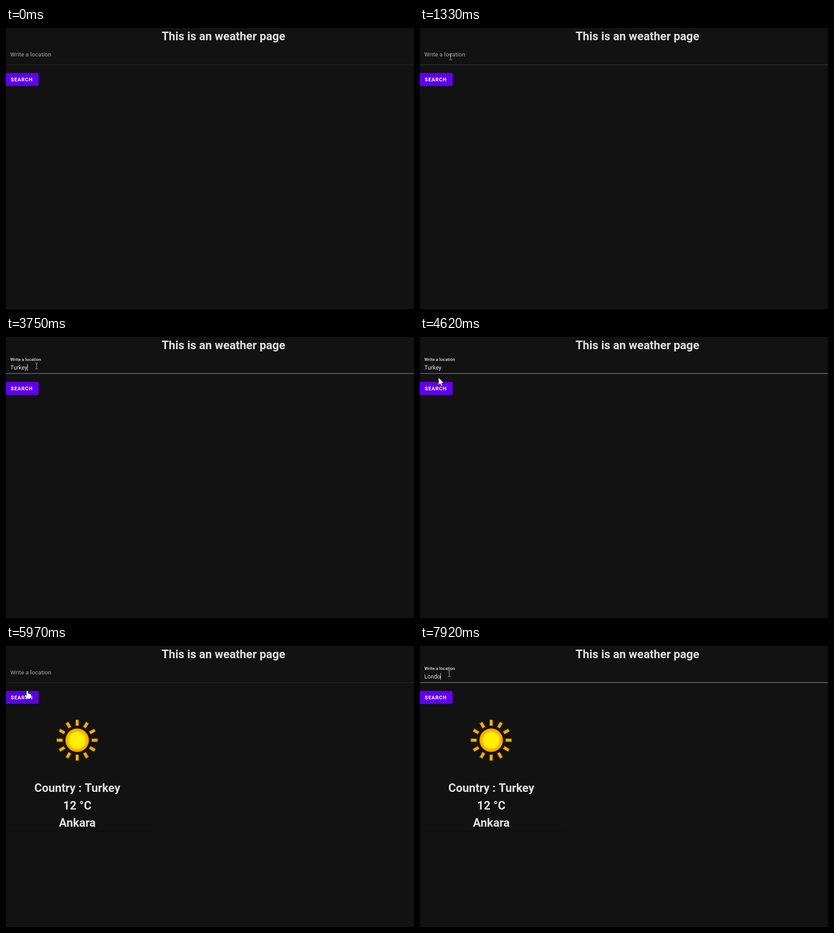
Recreate the animation shown at these times as an HTML page with a canvas. Size 900 by 622 pixels, loop 8 s.

```html
<!DOCTYPE html>
<html>
<head>
<meta charset="utf-8">
<title>Weather page</title>
<style>
html, body { margin: 0; width: 100%; height: 100%; overflow: hidden; background: #121212 }
canvas { display: block }
</style>
</head>
<body>
<canvas id="stage" width="900" height="622"></canvas>
<script>
const ctx = document.getElementById('stage').getContext('2d');
const LOOP = 8000, LIGHT = '#e0e0e0';
const FOCUS = [1425, 6378], BLUR = 4680, RESULT = 5090;
const CLICKS = [[1400, 1680], [4680, 4950], [6370, 6650]];
const KEYS = [
  [2470, 'T'], [3000, 'Tu'], [3220, 'Tur'], [3420, 'Turk'], [3550, 'Turke'], [3750, 'Turkey'],
  [RESULT, ''], [7320, 'L'], [7520, 'Lo'], [7720, 'Lon'], [7820, 'Lond'], [7920, 'Londo']
];
// time, x, y of the pointer's hot spot
const PATH = [
  [570, 130, 573], [1330, 67, 65], [1400, 67, 64.5], [4220, 67, 64.5], [4350, 37, 67],
  [4500, 37, 67], [4750, 45.5, 115], [5640, 45.5, 115], [5770, 46, 111], [5900, 46, 111],
  [5970, 47, 99], [6370, 61, 58], [6650, 64.5, 61]
];
const HAND = new Path2D('M-1.7 1Q0-1 1.7 1V6L4.2 6.6L6.8 7.6Q8.3 8.3 8.2 10V13L6.5 17.5H-1.5L-5 11.8Q-5.6 9.4-3.5 9.8L-1.7 11.5Z');
const ARROW = new Path2D('M0 0V16L3.6 12.5L6 18L8.4 17L6 11.6H11Z');
const BEAM = new Path2D('M-3-6.5H-1L0-5.5L1-6.5H3M0-5.5V5.5M-3 6.5H-1L0 5.5L1 6.5H3');

const clamp = v => Math.max(0, Math.min(1, v));
const mix = (a, b, p) => a + (b - a) * p;
const grey = v => `rgb(${v},${v},${v})`;

// cubic-bezier(.4, 0, .2, 1)
function ease(p) {
  p = clamp(p);
  let lo = 0, hi = 1;
  for (let i = 0; i < 16; i++) {
    const u = (lo + hi) / 2, v = 1 - u;
    if (1.2 * v * v * u + .6 * v * u * u + u * u * u < p) lo = u; else hi = u;
  }
  return 3 * lo * lo - 2 * lo * lo * lo;
}

function text(str, x, y, size, color, weight = 400, align = 'left', spacing = 0) {
  ctx.font = `${weight} ${size}px Roboto, sans-serif`;
  ctx.letterSpacing = spacing + 'px';
  ctx.textAlign = align;
  ctx.fillStyle = color;
  ctx.fillText(str, x, y);
}

function rect(x, y, w, h, color) {
  ctx.fillStyle = color;
  ctx.fillRect(x, y, w, h);
}

function disc(x, y, r, color) {
  ctx.fillStyle = color;
  ctx.beginPath();
  ctx.arc(x, y, r, 0, 7);
  ctx.fill();
}

function pointerAt(t) {
  if (t < PATH[0][0]) return null;
  let i = 0;
  while (i < PATH.length - 2 && t >= PATH[i + 1][0]) i++;
  const [t0, x0, y0] = PATH[i], [t1, x1, y1] = PATH[i + 1];
  let p = clamp((t - t0) / (t1 - t0));
  if (i === 0) p = 1 - (1 - p) ** 2;
  const x = mix(x0, x1, p), y = mix(y0, y1, p);
  const kind = y > 37 && y < 82 ? 'beam' : y >= 98 && y < 128 && x < 72 ? 'hand' : 'arrow';
  return { x, y, kind };
}

function drawField(t, hover) {
  const start = t >= FOCUS[1] ? FOCUS[1] : FOCUS[0];
  const focused = t >= start && !(t >= BLUR && t < FOCUS[1]);
  const grow = ease((t - start) / 150);
  const back = t >= RESULT && t < FOCUS[1] ? ease((t - RESULT) / 150) : 0;
  const float = grow - back;
  const tone = focused ? mix(137, 224, grow) : 137;
  text('Write a location', 9.6, mix(63.4, 53, float), mix(12.8, 9.6, float), grey(tone), 500, 'left', mix(.05, .04, float));

  rect(0, 81, 900, 1, focused || hover ? '#444' : '#2a2a2a');
  if (focused) rect(480 - 480 * grow, 80, 960 * grow, 1, '#727272');

  const key = KEYS.filter(k => k[0] <= t).pop() || [0, ''];
  text(key[1], 9.6, 71.5, 12.8, LIGHT);
  const since = t - Math.max(start, key[0]);
  if (focused && Math.floor(since / 530) % 2 === 0)
    rect(Math.floor(9.6 + ctx.measureText(key[1]).width), 60, 1, 15, LIGHT);
}

function drawButton(t, hover) {
  const press = clamp((t - BLUR) / 150) * clamp((5300 - t) / 200);
  ctx.save();
  if (hover) {
    ctx.shadowColor = 'rgba(0,0,0,.6)';
    ctx.shadowBlur = 6;
    ctx.shadowOffsetY = 2;
  }
  ctx.fillStyle = hover ? '#5b00dd' : '#6200ee';
  ctx.beginPath();
  ctx.roundRect(-4, 99.4, 76, 28.8, 3);
  ctx.fill();
  ctx.restore();
  text('SEARCH', 10.6, 118, 11.2, '#fff', 700, 'left', .9);
  if (press > 0) rect(0, 99, 72, 29, `rgba(18,18,18,${.2 * press})`);
}

function drawSun(x, y) {
  ctx.save();
  ctx.translate(x, y);
  for (let i = 0; i < 12; i++) {
    for (const [w, a, b, color] of [[8.5, 31, 46, 'rgba(150,95,0,.55)'], [6, 32.5, 44.5, '#ffae00']]) {
      ctx.lineWidth = w;
      ctx.strokeStyle = color;
      ctx.beginPath();
      ctx.moveTo(0, a);
      ctx.lineTo(0, b);
      ctx.stroke();
    }
    ctx.rotate(Math.PI / 6);
  }
  const g = ctx.createRadialGradient(0, 0, 0, 0, 0, 26.5);
  for (const [p, c] of [[0, '#fff200'], [.62, '#fff000'], [.78, '#ffb400'], [.94, '#ffa800'], [1, 'rgba(150,95,0,.5)']])
    g.addColorStop(p, c);
  disc(0, 0, 26.5, g);
  ctx.restore();
}

function drawCard() {
  drawSun(157, 208.5);
  ['Country : Turkey', '12 °C', 'Ankara'].forEach((line, i) =>
    text(line, 157.3, 323 + 38.5 * i, 25.6, LIGHT, 700, 'center'));
  rect(0, 409, 320, 2, '#0f0f0f');
}

function drawPointer({ x, y, kind }) {
  ctx.save();
  ctx.translate(x, y);
  ctx.lineWidth = 1;
  if (kind === 'beam') {
    ctx.translate(Math.floor(x) + .5 - x, Math.floor(y) - y);
    ctx.strokeStyle = '#d0d0d0';
    ctx.stroke(BEAM);
  } else {
    const shape = kind === 'hand' ? HAND : ARROW;
    ctx.lineWidth = 1.6;
    ctx.strokeStyle = '#000';
    ctx.stroke(shape);
    ctx.fillStyle = '#fff';
    ctx.fill(shape);
  }
  ctx.restore();
}

function draw(now) {
  const t = now % LOOP, pointer = pointerAt(t), over = pointer && pointer.kind;
  rect(0, 0, 900, 622, '#121212');
  text('This is an weather page', 479.6, 26.5, 25.6, LIGHT, 700, 'center');
  drawField(t, over === 'beam');
  drawButton(t, over === 'hand');
  if (t >= RESULT) drawCard();
  if (pointer) {
    if (CLICKS.some(([a, b]) => t >= a && t < b))
      disc(pointer.x - 1, pointer.y - 2, 12, 'rgba(255,255,0,.5)');
    drawPointer(pointer);
  }
  requestAnimationFrame(draw);
}
requestAnimationFrame(draw);
</script>
</body>
</html>
```
